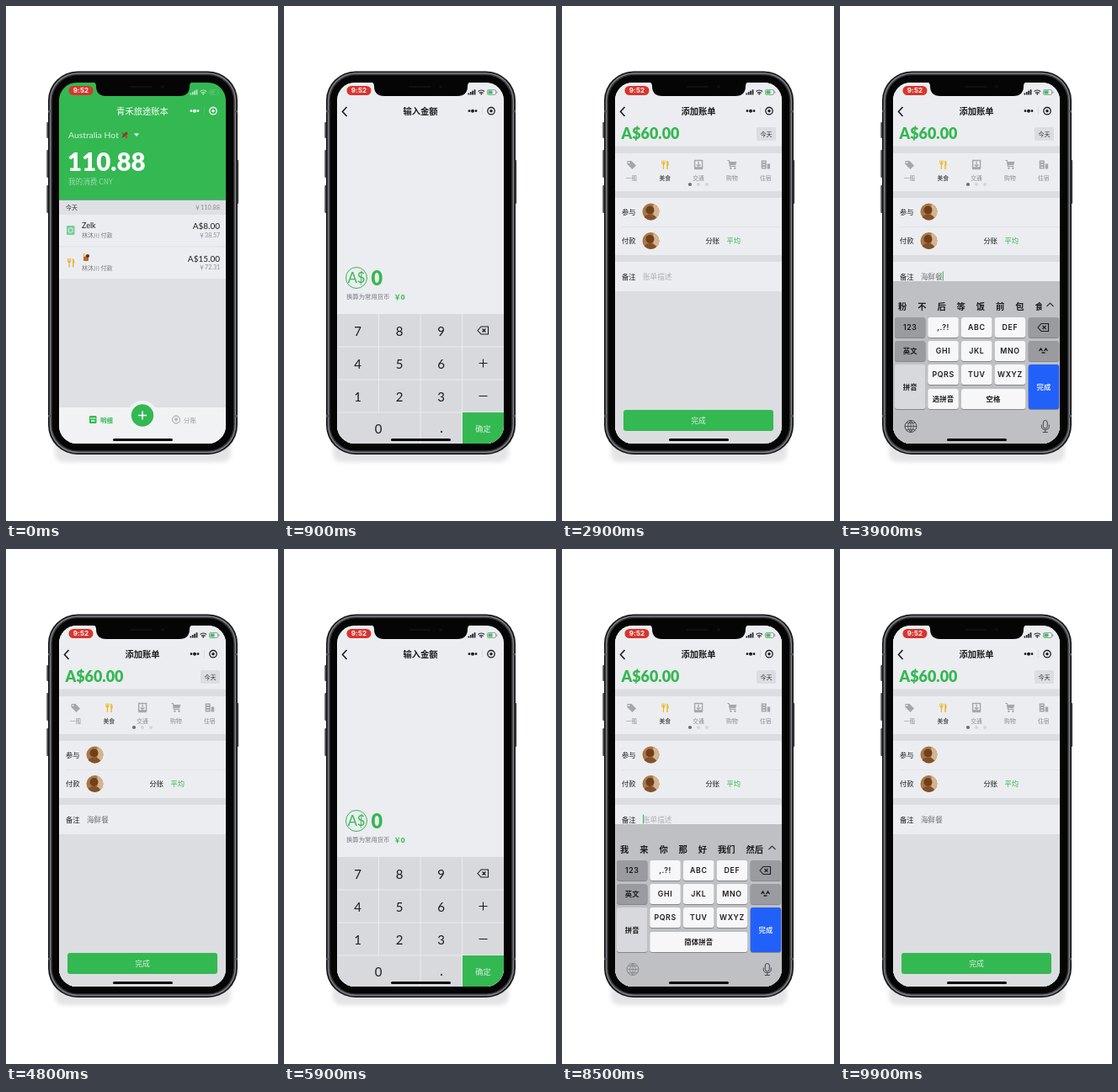
These frames come from a looping animation (323 px wide and 612 px high, 10 s). An HTML page with a canvas:

```html
<!DOCTYPE html>
<html lang="zh">
<head>
<meta charset="utf-8">
<style>
html, body { margin: 0; width: 100%; height: 100%; overflow: hidden; background: #fff; }
canvas { display: block; width: 323px; height: 612px; }
</style>
</head>
<body>
<canvas id="stage"></canvas>
<script>
const W = 323, H = 612, CYCLE = 5000;
const GREEN = '#34b852', PANEL = '#ecedf0', GAP = '#dcdde1', INK = '#1c1c1e', GREY = '#8b8c90';
const CJK = '"Noto Sans CJK SC", "Noto Sans CJK", sans-serif';
const LATIN = 'Lato, "Noto Sans CJK SC", sans-serif';
const canvas = document.getElementById('stage');
const ctx = canvas.getContext('2d');
const dpr = window.devicePixelRatio || 1;
canvas.width = W * dpr;
canvas.height = H * dpr;

const clamp = v => Math.max(0, Math.min(1, v));
const ease = v => v < .5 ? 2 * v * v : 1 - 2 * (1 - v) ** 2;
const tween = (t, start, length) => ease(clamp((t - start) / length));

function rect(x, y, w, h, fill) {
  ctx.fillStyle = fill;
  ctx.fillRect(x, y, w, h);
}
function round(x, y, w, h, r, fill, stroke, line = 1) {
  ctx.beginPath();
  ctx.roundRect(x, y, w, h, r);
  paint(fill, stroke, line);
}
function circle(x, y, r, fill, stroke, line = 1) {
  ctx.beginPath();
  ctx.arc(x, y, r, 0, 7);
  paint(fill, stroke, line);
}
function paint(fill, stroke, line) {
  if (fill) { ctx.fillStyle = fill; ctx.fill(); }
  if (stroke) { ctx.strokeStyle = stroke; ctx.lineWidth = line; ctx.stroke(); }
}
function path(d, fill, stroke, line = 1, x = 0, y = 0) {
  ctx.save();
  ctx.translate(x, y);
  const p = new Path2D(d);
  if (fill) { ctx.fillStyle = fill; ctx.fill(p); }
  if (stroke) { ctx.strokeStyle = stroke; ctx.lineWidth = line; ctx.stroke(p); }
  ctx.restore();
}
function text(s, x, y, size, color, { weight = 400, align = 'left', font = CJK, gap = 0 } = {}) {
  ctx.font = `${weight} ${size}px ${font}`;
  ctx.letterSpacing = gap + 'px';
  ctx.textAlign = align;
  ctx.fillStyle = color;
  ctx.fillText(s, x, y);
}
const mid = (s, x, y, size, color, opts) => text(s, x, y, size, color, { align: 'center', ...opts });
const latin = (s, x, y, size, color, opts) => text(s, x, y, size, color, { font: LATIN, ...opts });

function cutlery(x, y, color) {
  path('M-4-5V-2Q-4 0-2.5 0V5.5H-1.2V0Q.3 0 .3-2V-5H-.7V-2H-1.4V-5H-2.4V-2H-3.1V-5ZM2-5Q5-4 4.2 1H3.5V5.5H2Z', color, null, 1, x, y);
}
const icons = [
  (x, y, c) => { path('M-5-4.5H0L5.5 1L1 5.5L-5-.5Z', c, null, 1, x, y); circle(x - 3, y - 2.5, 1, PANEL); },
  cutlery,
  (x, y, c) => {
    path('M-4.5-5H4.5V3.5H-4.5ZM-5 5H5', null, c, 1.4, x, y);
    path('M0-4V1M-2.5 0L0 2L2.5 0', null, c, 1.2, x, y);
  },
  (x, y, c) => {
    path('M-5.5-5H-3.5L-2.5 2H4.5', null, c, 1.2, x, y);
    path('M-3.2-3.5H5.5L4.3.8H-2.6Z', c, null, 1, x, y);
    circle(x - 1.5, y + 4.2, 1.2, c); circle(x + 3.5, y + 4.2, 1.2, c);
  },
  (x, y, c) => {
    path('M-5-5H1V5H-5ZM2-1H5.5V5H2Z', c, null, 1, x, y);
    [-3, 0, 3].forEach(dy => rect(x - 3.5, y + dy - .5, 3, 1, PANEL));
  }
];

function avatar(x, y) {
  ctx.save();
  circle(x, y, 10, '#a87846');
  ctx.clip();
  rect(x + 3, y - 10, 7, 20, '#d5b58b');
  circle(x - 1, y - 2, 5, '#6f401f');
  ctx.beginPath();
  ctx.ellipse(x - 1, y + 9, 8, 6, 0, 0, 7);
  paint('#82502a');
  ctx.restore();
}

function backspace(x, y) {
  path('M-6.5 0L-2.5-4.5H6V4.5H-2.5ZM-1-2L3 2M3-2L-1 2', null, INK, 1.1, x, y);
}

function listBody() {
  rect(63, 137, 198, 93.5, GREEN);
  rect(63, 230.5, 198, 289.5, '#dfe0e4');
  latin('Australia Hot', 74, 157, 10.4, '#d9f3df');
  path('M-4-4L-1-1L2-4L4-1L1 1L3 5L0 2L-4 4L-2 0Z', '#7a4528', null, 1, 141, 153);
  circle(143, 155, 1.5, '#d84432');
  path('M-3-1.5H3L0 2Z', '#fff', null, 1, 155, 153);
  latin('110.88', 73, 196, 29.5, '#fff', { weight: 900 });
  text('我的消费 CNY', 74, 212, 8.6, '#9bdcab');
  text('今天', 71, 242, 7, '#333');
  latin('￥110.88', 254, 242, 7.3, GREY, { align: 'right' });
  [['Zelk', 'A$8.00', '￥38.57'], ['', 'A$15.00', '￥72.31']].forEach(([name, sum, converted], i) => {
    const y = 248 + i * 38.5;
    rect(63, y, 198, 37.5, PANEL);
    latin(name, 90, y + 16, 9, INK);
    text('林沐川 付款', 90, y + 27, 7, '#78797d');
    latin(sum, 254, y + 17, 10, INK, { align: 'right' });
    latin(converted, 254, y + 26.5, 7, GREY, { align: 'right' });
  });
  round(72, 261, 9.5, 11, 1, '#78cf98');
  circle(76.7, 266.5, 2.7, null, '#e7f5eb', 1);
  cutlery(77, 305, '#e9b53f');
  round(92, 296, 6, 7, 1, '#b46b25');
  circle(97, 297, 2, '#4b3026');
  circle(93, 296, 2, '#efcc86');
  circle(162, 486.5, 17.5, '#f1f2f4');
  rect(63, 477, 198, 43, '#f1f2f4');
  circle(162, 486.5, 13.2, GREEN);
  path('M-5 0H5M0-5V5', null, '#fff', 1.5, 162, 486.5);
  round(99, 487, 8.5, 9, 1, GREEN);
  rect(100, 489.5, 6.5, 1, '#fff');
  rect(101, 492, 4.5, 2, '#c5edcf');
  text('明细', 112, 494.5, 7.4, GREEN, { weight: 700 });
  circle(202, 491.5, 4.5, null, '#9b9ca0', 1);
  path('M-1.5-2.5L0 0L1.5-2.5M0 0V2.5M-2 0H2', null, '#9b9ca0', .8, 202, 491.5);
  text('分账', 211, 494.5, 7.4, '#9b9ca0');
}

function amountBody(t) {
  const [amount, converted] = t < 1200 ? ['0', '0'] : t < 1500 ? ['6', '28.92']
    : t < 1850 ? ['60', '289.25'] : ['60.00', '289.25'];
  rect(63, 137, 198, 230, PANEL);
  circle(86, 323, 12.5, null, GREEN, 1);
  latin('A$', 86, 329, 16.5, GREEN, { align: 'center' });
  latin(amount, 103.5, 331.5, 23.5, GREEN, { weight: 900 });
  text('换算为常用货币', 74, 348, 7.35, '#77787c');
  latin('￥' + converted, 130.5, 348.5, 8.2, GREEN, { weight: 900 });
  rect(63, 366, 198, 154, '#d8d9dd');
  [405, 444, 483].forEach(y => rect(63, y - .5, 198, 1, '#ebecef'));
  [112.5, 162, 211.5].forEach((x, i) => rect(x - .5, 366, 1, i ? 154 : 117, '#ebecef'));
  '789456123'.split('').forEach((n, i) =>
    latin(n, 87.5 + i % 3 * 49.5, 391.5 + Math.floor(i / 3) * 39, 15, INK, { align: 'center' }));
  latin('0', 112, 508, 15, INK, { align: 'center' });
  latin('.', 187, 507, 17, INK, { align: 'center' });
  backspace(236.5, 385.5);
  path('M-5 0H5M0-5V5', null, INK, 1.1, 236.5, 424.5);
  path('M-5 0H5', null, INK, 1.1, 236.5, 463.5);
  rect(212, 483, 49, 37, GREEN);
  mid('确定', 236.5, 506, 9.2, '#d4f1da');
}

function billBody(t) {
  const chosen = t < 2900 ? 0 : 1;
  rect(63, 137, 198, 383, GAP);
  [[137, 29.5], [175, 45], [228, 68], [304, 35]].forEach(([y, h]) => rect(63, y, 198, h, PANEL));
  latin('A$60.00', 70.5, 158, 17.9, GREEN, { weight: 900 });
  round(231, 144, 23, 16, 2, '#dcdde1');
  mid('今天', 242.5, 154.7, 7, '#333');
  ['一般', '美食', '交通', '购物', '住宿'].forEach((label, i) => {
    const on = i === chosen, x = 82.5 + i * 39.8;
    icons[i](x, 188.5, on ? (i ? '#ebb92d' : GREEN) : '#a5a6a9');
    mid(label, x, 206.8, 6.8, on ? INK : GREY, { weight: on ? 500 : 400 });
  });
  [152, 162, 172].forEach((x, i) => circle(x, 212, 2.1, i ? '#d5d6da' : '#6d6e72'));
  text('参与', 71, 248, 8.3, INK);
  text('付款', 71, 282, 8.3, INK);
  rect(71, 262, 190, .7, '#dfe0e3');
  avatar(105.5, 244.5);
  avatar(105.5, 279);
  text('分账', 170.5, 282, 8.3, INK);
  text('平均', 195.5, 282, 8.3, GREEN);
  text('备注', 71, 324.8, 8.3, INK);
  const note = t < 3580 ? '' : t < 3660 ? 'hai' : t < 3740 ? 'hai xian' : t < 3820 ? 'hai xian can' : '海鲜餐';
  text(note || '账单描述', 96, 324.8, 8.6, note ? '#707175' : '#afb0b4');
  if (t > 3150 && t < 4250) {
    ctx.font = `400 8.6px ${CJK}`;
    rect(96 + (note ? ctx.measureText(note).width : 0), 315.5, 1, 11, GREEN);
  }
  round(73, 480, 178, 25, 3, GREEN);
  mid('完成', 162, 496, 8.8, '#d4f1da');
}

function key(x, y, w, h, label, fill = '#f7f7f9', color = INK) {
  round(x, y + 1, w, h, 3, '#85878b');
  round(x, y, w, h, 3, fill);
  const cjk = label.charCodeAt(0) > 255;
  mid(label, x + w / 2, y + h / 2 + 3.2, cjk ? 8.4 : 8.8, color,
    { weight: 600, font: cjk ? CJK : 'Inter, sans-serif', gap: cjk ? .2 : .6 });
}

function keyboard(t) {
  const up = tween(t, 3130, 250) * (1 - tween(t, 4220, 250));
  if (!up) return;
  const composing = t >= 3580;
  ctx.save();
  ctx.translate(0, (1 - up) * 193);
  rect(63, 327, 198, 193, '#bfc0c3');
  const words = !composing ? ['我', '来', '你', '那', '好', '我们', '然后']
    : t < 3820 ? ['海鲜餐', '海鲜', '还', '海'] : ['粉', '不', '后', '等', '饭', '前', '包', '食'];
  ctx.save();
  ctx.beginPath();
  ctx.rect(63, 327, 176.5, 43);
  ctx.clip();
  let x = 69;
  words.forEach(word => {
    text(word, x, 360.5, 10.3, INK, { weight: 600 });
    x += 12.9 + word.length * 10.3;
  });
  ctx.restore();
  path('M-4 2L0-2L4 2', null, '#333', 1.1, 249.5, 355);
  const dark = '#999b9f';
  key(65, 370, 36.5, 24, '123', dark);
  key(65, 398, 36.5, 24, '英文', dark);
  key(65, 426, 36.5, 53, '拼音', '#d8d9dc');
  [',.?!', 'ABC', 'DEF', 'GHI', 'JKL', 'MNO', 'PQRS', 'TUV', 'WXYZ'].forEach((label, i) =>
    key(104.3 + i % 3 * 39.7, 370 + Math.floor(i / 3) * 28, 36.5, 24, label));
  if (composing) {
    key(104.3, 455, 36.5, 24, '选拼音');
    key(144, 455, 76.2, 24, '空格');
  } else key(104.3, 455, 116, 24, '简体拼音');
  key(223.7, 370, 36.5, 24, ' ', dark);
  backspace(241.5, 382);
  key(223.7, 398, 36.5, 24, ' ', dark);
  path('M-5 1L-3-2L-1 1M1 1L3-2L5 1M-2 3H2', null, INK, 1.3, 241.5, 409);
  key(223.7, 426, 36.5, 53, '完成', '#2161fa', '#dce6ff');
  const tone = composing ? '#44464a' : '#85878b';
  circle(84, 499.5, 7, null, tone, 1);
  path('M-7 0H7M0-7V7M-5.5-4H5.5M-5.5 4H5.5M0-7Q-7 0 0 7Q7 0 0-7', null, tone, .8, 84, 499.5);
  round(241.3, 492.5, 5, 9.5, 2.5, null, '#44464a', 1);
  path('M-4.5-1V1Q-4.5 5 0 5Q4.5 5 4.5 1V-1M0 5V8M-3 8H3', null, '#44464a', 1, 243.8, 498.5);
  ctx.restore();
}

function statusIcons(color, rim, charge) {
  [0, 1, 2, 3].forEach(i => rect(218.5 + i * 2.4, 103.5 - i * 1.4, 1.7, 2 + i * 1.4, color));
  path('M-3.7-2Q0-5 3.7-2M-2.3 0Q0-2 2.3 0', null, color, 1.2, 234.3, 103.5);
  circle(234.3, 104.6, 1, color);
  round(241.5, 99.5, 10, 6, 1.5, null, rim, .8);
  rect(242.5, 100.5, 5, 4, charge);
  rect(252.3, 101.3, 1, 2.4, rim);
}

function header(title, color, bg, alpha, back) {
  ctx.save();
  ctx.globalAlpha = alpha;
  rect(63, 91, 198, 46, bg);
  mid(title, 162, 128.6, 10.3, color, { weight: back ? 700 : 500 });
  if (back) path('M5-5.5L0 0L5 5.5', null, color, 1.6, 69.5, 125.5);
  [220, 224, 228].forEach((x, i) => circle(x, 124.7, i === 1 ? 2 : 1.4, color));
  rect(235, 120, .7, 9, back ? '#d5d6d9' : '#52c46c');
  circle(246, 124.7, 4.2, null, color, 1.3);
  circle(246, 124.7, 1.7, color);
  if (back) statusIcons(color, '#8d8f92', '#35c759');
  else statusIcons('#bfe9c9', '#50c36b', '#50c36b');
  ctx.restore();
}

function slideIn(progress, body, t) {
  if (!progress) return;
  const dx = 198 * (1 - progress);
  ctx.save();
  ctx.translate(dx, 0);
  if (progress < 1) {
    const shade = ctx.createLinearGradient(58, 0, 63, 0);
    shade.addColorStop(0, '#0000');
    shade.addColorStop(1, '#0007');
    rect(58, 137, 5, 383, shade);
  }
  if (progress > .3) body(t);
  else rect(63, 137, 198, 383, PANEL);
  ctx.restore();
}

function phoneBody() {
  rect(0, 0, W, H, '#fff');
  ctx.save();
  ctx.filter = 'blur(2.5px)';
  round(58, 500, 209, 42, 10, '#e4e4e6');
  ctx.restore();
  [[138, 19], [171, 33], [213, 33]].forEach(([y, h]) => round(48.3, y, 3, h, 1, '#4a4b4e'));
  round(273.5, 183, 2.7, 52, 1, '#4a4b4e');
  const shell = (inset, fill) =>
    round(50 + inset, 77.5 + inset, 225 - inset * 2, 455.5 - inset * 2, 35 - inset, fill);
  shell(0, '#18191a');
  shell(1.8, '#808286');
  shell(3.3, '#38393c');
  shell(4.8, '#050506');
  [[50, 124], [271.5, 124], [50, 486], [271.5, 486]].forEach(([x, y]) => rect(x, y, 3.5, 2.5, '#55575b'));
}

function draw(now) {
  const t = now % CYCLE;
  const toAmount = tween(t, 400, 350), toBill = tween(t, 2020, 400);
  ctx.setTransform(dpr, 0, 0, dpr, 0, 0);
  phoneBody();
  ctx.save();
  ctx.beginPath();
  ctx.roundRect(63, 91, 198, 429, 21);
  ctx.clip();
  listBody();
  slideIn(toAmount, amountBody, t);
  slideIn(toBill, billBody, t);
  keyboard(t);
  header('青禾旅途账本', '#fff', GREEN, 1, false);
  header('输入金额', INK, PANEL, toAmount, true);
  if (toBill > .15) header('添加账单', INK, PANEL, clamp((toBill - .15) / .5), true);
  round(74.5, 95, 29, 11, 5.5, '#da342d');
  mid('9:52', 89, 103.4, 8, '#fff', { weight: 700, font: 'Inter, sans-serif', gap: .2 });
  round(127, 514, 71, 3, 1.5, '#08080a');
  ctx.restore();
  path('M103 90Q107 91 107 95Q107 107 119 107H206Q218 107 218 95Q218 91 222 90Z', '#050506');
  round(148, 95, 26, 2, 1, '#101112');
  circle(186, 96, 2, '#0e1016');
}

const start = performance.now();
function loop() {
  draw(performance.now() - start);
  requestAnimationFrame(loop);
}
loop();
</script>
</body>
</html>
```
